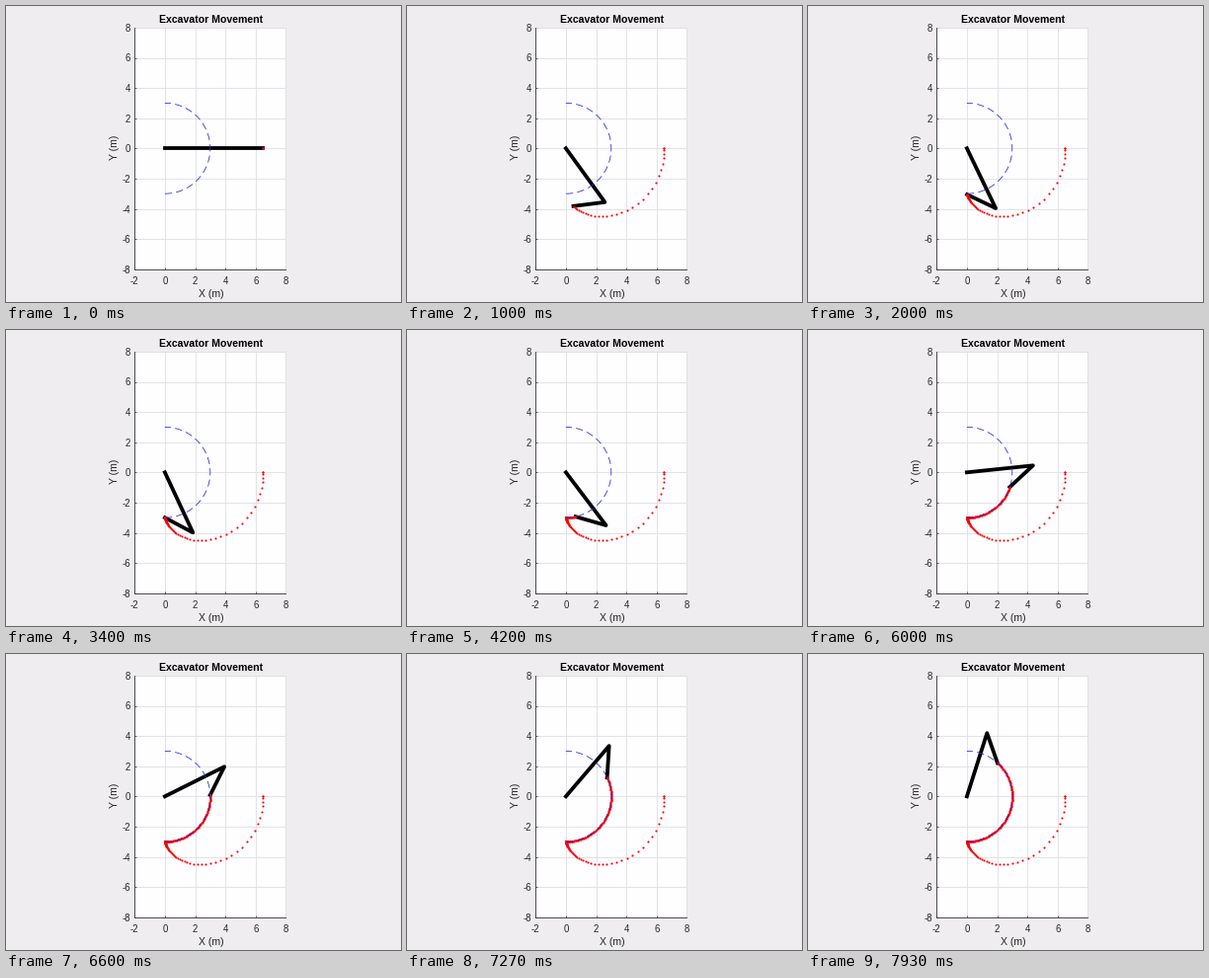
Write a matplotlib script that moves like this. It is 400 px wide and 300 px high and loops after 8 s.

```python
import numpy as np
import matplotlib.pyplot as plt
from matplotlib.animation import FuncAnimation

W, H, DPI = 400, 300, 100
LOOP, TICK, POSES = 8000, 20, 120
LEAD = 14  # ms by which a pose may appear early, so 15 poses/s fit the tick grid
BOOM, STICK, RADIUS = 4.4, 2.1, 3.0
DT, KP, KD = 0.05, 4.0, 4.0
SWING_STEP, SWING_RATE = 99, 0.4
INK, AXIS, GRID = "#262626", "#3c3c3c", "#e0dfe1"


def px(n):
    """Pixels to points."""
    return n * 72 / DPI


def simulate(steps):
    """Joint angles under PD control: reach the arc's foot, then swing along it."""
    fold = -np.arccos((RADIUS**2 - BOOM**2 - STICK**2) / (2 * BOOM * STICK))
    lead = np.arctan2(STICK * np.sin(fold), BOOM + STICK * np.cos(fold))
    q, v = np.zeros(2), np.zeros(2)
    path = []
    for n in range(steps):
        path.append(q)
        swing = SWING_RATE * DT * max(0, n - SWING_STEP)
        goal = np.array([-np.pi / 2 - lead + swing, fold])
        acc = KP * (goal - q) - KD * v
        q, v = q + v * DT, v + acc * DT
    return np.array(path)


angles = simulate(2 * POSES)
q1, q12 = angles[:, 0], angles.sum(axis=1)
elbow = BOOM * np.column_stack([np.cos(q1), np.sin(q1)])
tip = elbow + STICK * np.column_stack([np.cos(q12), np.sin(q12)])

plt.rcParams["font.family"] = "Liberation Sans"
fig = plt.figure(figsize=(W / DPI, H / DPI), dpi=DPI, facecolor="#efedf0")
ax = fig.add_axes([130.3 / W, 33.3 / H, 153 / W, 244.8 / H], facecolor="#fefdff")
ax.set(xlim=(-2, 8), ylim=(-8, 8),
       xticks=range(-2, 9, 2), yticks=range(-8, 9, 2))
ax.set_xticklabels([str(x) for x in range(-2, 9, 2)])
ax.set_yticklabels([str(y) for y in range(-8, 9, 2)])
ax.set_axisbelow(True)
ax.grid(color=GRID, lw=px(0.9))
ax.tick_params(direction="in", length=px(2), width=px(0.8), color=AXIS,
               labelcolor=INK, labelsize=px(9.7))
ax.tick_params(axis="x", pad=px(7.5))
ax.tick_params(axis="y", pad=px(4.3))
for side, spine in ax.spines.items():
    dark = side in ("left", "bottom")
    spine.set(linewidth=px(0.9), color=AXIS if dark else GRID,
              zorder=2.5 if dark else 1)


def label(x, y, text, **kw):
    fig.text(x / W, 1 - y / H, text, size=px(10.45), ha="center", **kw)


label(207.5, 17, "Excavator Movement", weight="bold", color="black", va="baseline")
label(207.7, 295, "X (m)", color=INK, va="baseline")
label(109.8, 143.8, "Y (m)", color=INK, va="center", rotation=90)

arm, = ax.plot([], [], color="black", lw=px(3.8), zorder=3,
               solid_capstyle="projecting", solid_joinstyle="round")
trace, = ax.plot([], [], "o", color="red", ms=px(2.1), mew=0, zorder=4)
trace.set_snap(False)

arc = np.linspace(-np.pi / 2, np.pi / 2, 200)
ax.plot(RADIUS * np.cos(arc), RADIUS * np.sin(arc), color="#2a2add", lw=px(0.8),
        dashes=(7.3 / 0.8, 4.2 / 0.8), dash_capstyle="butt", zorder=5)


def draw(k):
    pose = (k * TICK + LEAD) * POSES // LOOP
    n = 2 * pose + 1
    arm.set_data([0, elbow[n, 0], tip[n, 0]], [0, elbow[n, 1], tip[n, 1]])
    trace.set_data(tip[:n + 1, 0], tip[:n + 1, 1])
    return arm, trace


anim = FuncAnimation(fig, draw, frames=LOOP // TICK, interval=TICK,
                     repeat=True, repeat_delay=0, blit=False)
plt.show()
```
